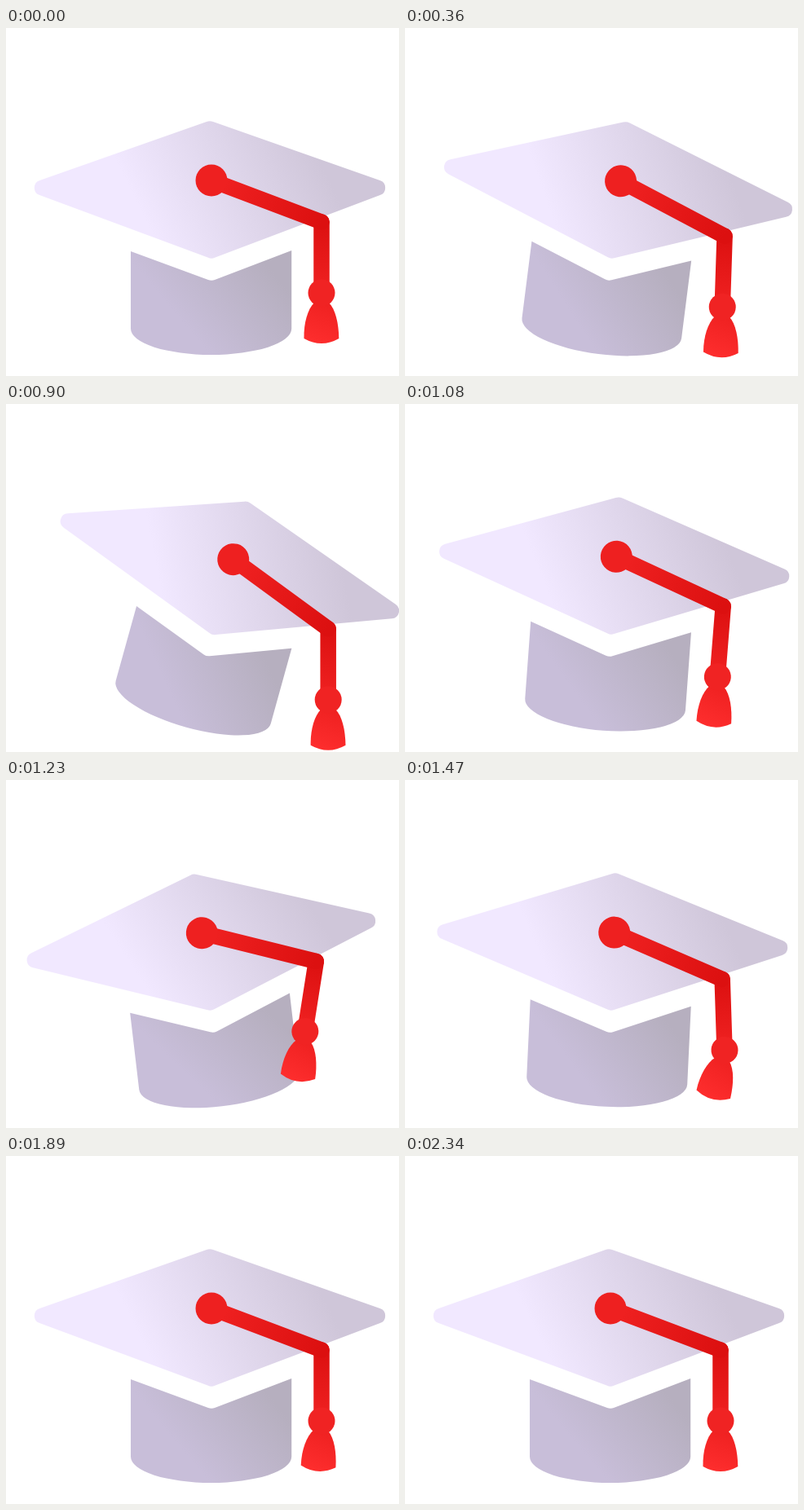
An HTML page for the animation above (2.55 s loop, 482x427 px).

```html
<!DOCTYPE html>
<html lang="en">
<head>
<meta charset="utf-8">
<title>Graduation cap</title>
<style>
  html, body { margin: 0; width: 100%; height: 100%; overflow: hidden; background: #fff; }
  svg { display: block; width: 100vw; height: 100vh; }
</style>
</head>
<body>
<svg viewBox="0 0 482 427">
  <defs>
    <linearGradient id="boardFill" gradientUnits="userSpaceOnUse" x1="162" y1="218" x2="362" y2="118">
      <stop offset="0" stop-color="#f1e8ff"/>
      <stop offset="1" stop-color="#cfc6d9"/>
    </linearGradient>
    <linearGradient id="baseFill" gradientUnits="userSpaceOnUse" x1="220" y1="365" x2="315" y2="285">
      <stop offset="0" stop-color="#c8bed9"/>
      <stop offset="1" stop-color="#b6afbf"/>
    </linearGradient>
    <linearGradient id="cordFill" gradientUnits="userSpaceOnUse" x1="252" y1="187" x2="387" y2="238">
      <stop offset="0" stop-color="#f02222"/>
      <stop offset="1" stop-color="#dc1010"/>
    </linearGradient>
    <linearGradient id="dropFill" gradientUnits="userSpaceOnUse" x1="391" y1="238" x2="383" y2="325">
      <stop offset="0" stop-color="#dc1010"/>
      <stop offset="1" stop-color="#f02222"/>
    </linearGradient>
    <linearGradient id="tasselFill" gradientUnits="userSpaceOnUse" x1="400" y1="335" x2="380" y2="385">
      <stop offset="0" stop-color="#ee2020"/>
      <stop offset="1" stop-color="#fd2d2d"/>
    </linearGradient>
  </defs>
  <g id="cap">
    <path fill="url(#baseFill)" d="M153 274L248 309Q252 310.6 256 309L350.2 273V369A98.6 32 0 0 1 153 369Z"/>
    <path fill="url(#boardFill)" d="M41.4 187L246 115Q250 113.4 254 115L458.600 187A9.500 9.500 0 0 1 458.800 205L256 281.800Q252 283.600 248 281.800L41.200 205A9.500 9.500 0 0 1 41.400 187Z"/>
    <g id="drop">
      <path d="M387 238V325" stroke="url(#dropFill)" stroke-width="19.500" stroke-linecap="round"/>
      <g id="tassel">
        <path fill="url(#tasselFill)" d="M378 337C370 345 365 362 365.500 381Q387 393 408.300 381C408 362 404 345 396 337Z"/>
        <circle cx="387" cy="325" r="16.500" fill="#f02323"/>
      </g>
    </g>
    <path d="M252 187L387 238" stroke="url(#cordFill)" stroke-width="19.500" stroke-linecap="round"/>
    <circle cx="252" cy="187" r="19.500" fill="#ee2020"/>
  </g>
</svg>
<script>
const LOOP = 2550, STEP = 30;

// Each part: pivot and [time, angle] keys
const parts = [
  { id: "cap", x: 252, y: 287, lift: true,
    keys: [[0, 0], [900, 15.5], [1260, -7.1], [1500, 3.1], [1680, -1.2], [1830, 0]] },
  { id: "drop", x: 387, y: 238,
    keys: [[0, 0], [900, -15.5], [1260, 16.2], [1500, -5.4], [1680, 2], [1830, 0]] },
  { id: "tassel", x: 387, y: 325,
    keys: [[0, 0], [1230, 0], [1470, 16], [1680, -9], [1900, 4], [2130, -3.2], [2340, 0]] }
];
for (const p of parts) p.el = document.getElementById(p.id);

const sine = u => (1 - Math.cos(Math.PI * u)) / 2;

// Cubic ease with a longer settling phase
function lift(u) {
  let lo = 0, hi = 1, s = u;
  for (let i = 0; i < 24; i++) {
    s = (lo + hi) / 2;
    const r = 1 - s;
    const x = r * r * s + 1.35 * r * s * s + s * s * s;
    if (x < u) lo = s; else hi = s;
  }
  return s * s * (3 - 2 * s);
}

function angleAt(part, t) {
  const k = part.keys;
  for (let i = 1; i < k.length; i++) {
    const [t0, a] = k[i - 1], [t1, b] = k[i];
    if (t < t1) {
      const ease = part.lift && i === 1 ? lift : sine;
      return a + (b - a) * ease((t - t0) / (t1 - t0));
    }
  }
  return 0;
}

function draw(time) {
  const t = Math.floor((time % LOOP) / STEP) * STEP;
  for (const p of parts) {
    p.el.setAttribute("transform", `rotate(${angleAt(p, t).toFixed(3)} ${p.x} ${p.y})`);
  }
}

let start = null;
function tick(now) {
  if (start === null) start = now;
  draw(Math.max(0, now - start));
  requestAnimationFrame(tick);
}
draw(0);
requestAnimationFrame(tick);
</script>
</body>
</html>
```
